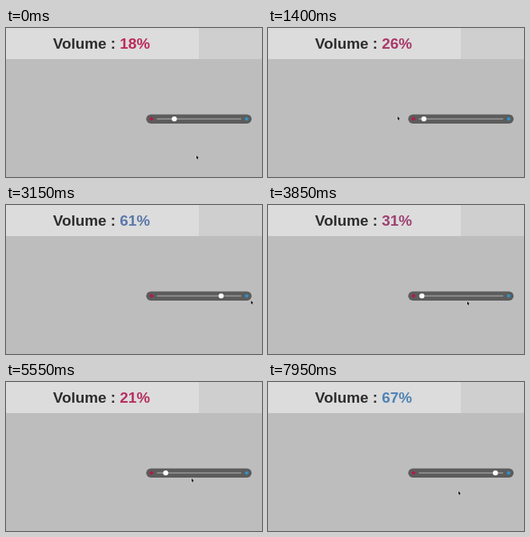
Animation of 320 by 187 pixels, one loop 8 s. Source, as an HTML page with a canvas:

```html
<!DOCTYPE html>
<html lang="en">
<head>
<meta charset="utf-8">
<title>Volume slider</title>
<style>
  html, body { margin: 0; width: 100%; height: 100%; overflow: hidden; background: #bdbdbd; }
  canvas { display: block; width: 100vw; height: 100vh; }
</style>
</head>
<body>
<canvas id="stage"></canvas>
<script>
const W = 320, H = 187, LOOP = 8000, STEP = 50;
const MID = 114.1, LEFT = 192, RIGHT = 294;
const canvas = document.getElementById('stage');
const ctx = canvas.getContext('2d');

// Turning points: [time, value, ...], joined by cosine easing
const volume = [
  [0, 18], [850, 38], [1400, 26], [2500, 77], [4300, 23],
  [5050, 30], [6300, 3], [6850, 3], [7950, 67]
];
const knob = [
  [0, 210], [850, 235], [1500, LEFT], [2800, RIGHT], [3850, LEFT],
  [4750, 221], [5950, LEFT], [6850, LEFT], [7800, RIGHT], [8150, 268]
];
const pointer = [
  [0, 238, 160], [1400, 162, 111], [1750, 258, 181], [2300, 259, 119], [3300, 309, 120],
  [3850, 249, 121], [5550, 232, 121], [6850, 191, 114], [7600, 267, 128], [7950, 238, 137]
];

function sample(keys, t) {
  const next = keys.findIndex(key => key[0] > t);
  if (next < 0) return keys.at(-1).slice(1);
  const [t0, ...from] = keys[next - 1], [t1, ...to] = keys[next];
  const e = (1 - Math.cos(Math.PI * (t - t0) / (t1 - t0))) / 2;
  return from.map((v, i) => v + (to[i] - v) * e);
}

function rect(x, y, w, h, color, radius = 0) {
  ctx.fillStyle = color;
  ctx.beginPath();
  ctx.roundRect(x, y, w, h, radius);
  ctx.fill();
}

function dot(x, r, color) {
  rect(x - r, MID - r, 2 * r, 2 * r, color, r);
}

function diamond(x, r, color) {
  ctx.fillStyle = color;
  ctx.fill(new Path2D(`M${x - r} ${MID}l${r} ${-r}l${r} ${r}l${-r} ${r}z`));
}

function levelColor(v) {
  const low = [228, 8, 58], high = [5, 190, 240];
  return `rgb(${low.map((c, i) => Math.round(c + (high[i] - c) * v / 100))})`;
}

function drawTitle(v) {
  const label = 'Volume : ', value = Math.round(v) + '%';
  ctx.font = 'bold 18.9px "Liberation Sans", Arial, sans-serif';
  const labelWidth = ctx.measureText(label).width;
  const x = 119.4 - (labelWidth + ctx.measureText(value).width) / 2;
  ctx.fillStyle = '#2d2d2d';
  ctx.fillText(label, x, 26.1);
  ctx.fillStyle = levelColor(v);
  ctx.fillText(value, x + labelWidth, 26.1);
}

function drawSlider(x) {
  rect(175.3, 108.4, 131.7, 11.6, '#5c5c5c', 5.8);
  rect(188.5, 113.5, 105.5, 1.3, '#a3a3a3');
  diamond(181.8, 2.7, '#b81845');
  diamond(300.8, 2.7, '#2f93c8');
  dot(x + 0.4, 3.2, '#fff');
}

function drawPointer(x, y, path, fill, outline) {
  ctx.save();
  ctx.translate(x, y);
  ctx.lineWidth = 0.8;
  ctx.strokeStyle = outline;
  ctx.stroke(path);
  ctx.fillStyle = fill;
  ctx.fill(path);
  ctx.restore();
}

const arrow = new Path2D('M0 0V4.3L.9 3.5L1.6 5L2.3 4.7L1.7 3.2L3 3.1Z');
const hand = new Path2D('M-.6 4V.7Q.1-.5.8.7V2.3L2.9 3V5L2 6.4H-.6L-1.8 4.2Z');

function draw(t) {
  const [v] = sample(volume, t), [k] = sample(knob, t), [x, y] = sample(pointer, t);
  rect(0, 0, W, H, '#bdbdbd');
  rect(0, 0, 241, 39, '#dcdcdc');
  rect(241, 0, 79, 39, '#cfcfcf');
  drawTitle(v);
  drawSlider(k);
  if (Math.hypot(x - k, y - MID) < 4) drawPointer(x, y, hand, '#fff', '#222');
  else drawPointer(x, y, arrow, '#111', 'rgba(255,255,255,.6)');
}

function resize() {
  const ratio = window.devicePixelRatio || 1;
  const w = Math.round(innerWidth * ratio), h = Math.round(innerHeight * ratio);
  if (canvas.width !== w || canvas.height !== h) {
    canvas.width = w;
    canvas.height = h;
  }
  ctx.setTransform(w / W, 0, 0, h / H, 0, 0);
}

const start = performance.now();
function tick() {
  resize();
  const t = (performance.now() - start) % LOOP;
  draw(Math.floor(t / STEP) * STEP);
  requestAnimationFrame(tick);
}
tick();
</script>
</body>
</html>
```
